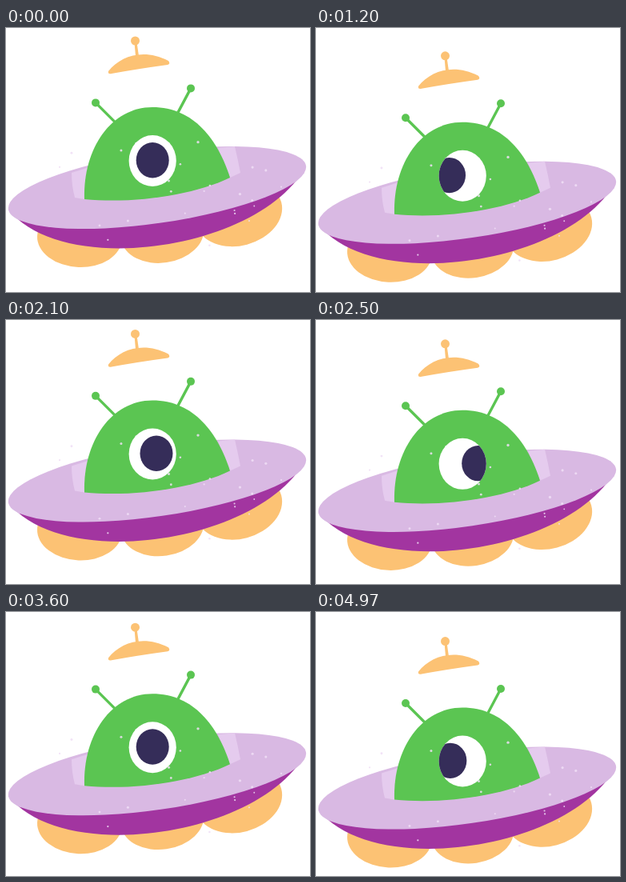
Write an HTML page with a canvas that moves like this. It is 380 px wide and 330 px high and loops after 5.07 s.

```html
<!DOCTYPE html>
<html lang="en">
<head>
<meta charset="utf-8">
<title>Hovering saucer</title>
<style>
  html, body { margin: 0; width: 100%; height: 100%; overflow: hidden; background: #fff; }
  canvas { display: block; }
</style>
</head>
<body>
<canvas id="stage" width="380" height="330"></canvas>
<script>
const ctx = document.getElementById('stage').getContext('2d');
const LOOP = 5070, POSES = 63, BOB_STEPS = 24, EYE_STEPS = 48;
const GREEN = '#5bc552', LILAC = '#d9b9e3', GLASS = '#e5cbee', SPECK = 'rgba(240,222,246,.85)',
      PURPLE = '#a235a0', ORANGE = '#fcc274', NAVY = '#352d59';
const SHIP = { x: 189, y: 199.5, rx: 188, ry: 44.3, tilt: -0.145 };

// The belly is drawn in the ship's tilted frame, the rest in stage coordinates
const BELLY = new Path2D('M-188 0C-132 96 118 96 188 0Z');
const DOME = new Path2D('M98 214C96 150 132 99 183 99C235 99 265 140 280 187C235 209 160 220 98 214Z');
const WINDOWS = new Path2D('M82 181L104 174L98 214L86 212Q82 197 82 181ZM265 150L286 148Q290 165 293 181L280 187Z');
const HAT = new Path2D('M128 54C143 35 172 25 203 41Q206 45 202 46Q165 51 132 57Q127 58 128 54Z');
const STEM = new Path2D('M160.5 18L163.5 18L166 35L162 35Z');

function fill(path, color) {
  ctx.fillStyle = color;
  ctx.fill(path);
}

function oval(x, y, rx, ry, color, tilt = 0) {
  ctx.beginPath();
  ctx.ellipse(x, y, rx, ry, tilt, 0, Math.PI * 2);
  ctx.fillStyle = color;
  ctx.fill();
}

function antenna(x, y, footX, footY) {
  ctx.beginPath();
  ctx.moveTo(x, y);
  ctx.lineTo(footX, footY);
  ctx.lineWidth = 3.4;
  ctx.strokeStyle = GREEN;
  ctx.stroke();
  oval(x, y, 5, 5, GREEN);
}

function seededRandom(seed) {
  return () => (seed = (seed * 16807) % 2147483647) / 2147483647;
}

// Paint flecks scattered over the ship, the same in every pose
function drawSpeckles() {
  const random = seededRandom(41);
  for (let i = 0; i < 26; i++) {
    const angle = random() * Math.PI * 2, reach = Math.sqrt(random());
    const x = SHIP.x + 165 * reach * Math.cos(angle);
    const y = SHIP.y + 8 + 75 * reach * Math.sin(angle);
    const r = 0.9 + 0.8 * random();
    oval(x, y, r, r, SPECK);
  }
}

// Eased progress of a move between two steps
function ease(step, from, to) {
  const p = Math.min(1, Math.max(0, (step - from) / (to - from)));
  return p < 0.5 ? 4 * p ** 3 : 1 - 4 * (1 - p) ** 3;
}

// Look left, then right, then back to the middle
function gaze(step) {
  const left = -16.7, right = 19.5;
  return left * ease(step, 10, 15.5)
    + (right - left) * ease(step, 22, 29.5)
    - right * ease(step, 36, 42.5);
}

function lidOpening(step) {
  const d = Math.min(1, Math.abs(step - 7) / 3);
  return Math.sin(d * Math.PI / 2) ** 2;
}

function drawEye(step) {
  ctx.save();
  oval(183.2, 166, 29.6, 32 * lidOpening(step), '#fff');
  ctx.clip();
  oval(183.2 + gaze(step), 165.3, 20.5, 22.2, NAVY);
  ctx.restore();
}

function drawSaucer() {
  oval(92, 262, 53, 37, ORANGE, 0.04);
  oval(195.5, 257, 52, 36.5, ORANGE, SHIP.tilt);
  oval(291, 232, 55, 40, ORANGE, -0.26);
  ctx.save();
  ctx.translate(SHIP.x, SHIP.y);
  ctx.rotate(SHIP.tilt);
  fill(BELLY, PURPLE);
  oval(0, 0, SHIP.rx, SHIP.ry, LILAC);
  ctx.restore();
  fill(WINDOWS, GLASS);
}

function drawHat() {
  fill(STEM, ORANGE);
  fill(HAT, ORANGE);
  oval(161.5, 16, 5.5, 5.5, ORANGE);
}

function draw(step) {
  const bob = 11 * (1 - Math.cos(2 * Math.PI * step / BOB_STEPS));
  ctx.fillStyle = '#fff';
  ctx.fillRect(0, 0, 380, 330);
  ctx.save();
  ctx.translate(0, bob);
  drawSaucer();
  antenna(112, 93.4, 138, 119.4);
  antenna(231, 75.4, 214, 107.4);
  fill(DOME, GREEN);
  drawSpeckles();
  drawEye(step % EYE_STEPS);
  drawHat();
  ctx.restore();
}

// 12.5 poses per second, shown on a 30 Hz clock
function frame() {
  const tick = Math.floor((performance.now() % LOOP + 4) * 0.03);
  draw(Math.min(POSES - 1, Math.floor(tick / 2.4 + 1e-6)));
  requestAnimationFrame(frame);
}
frame();
</script>
</body>
</html>
```
